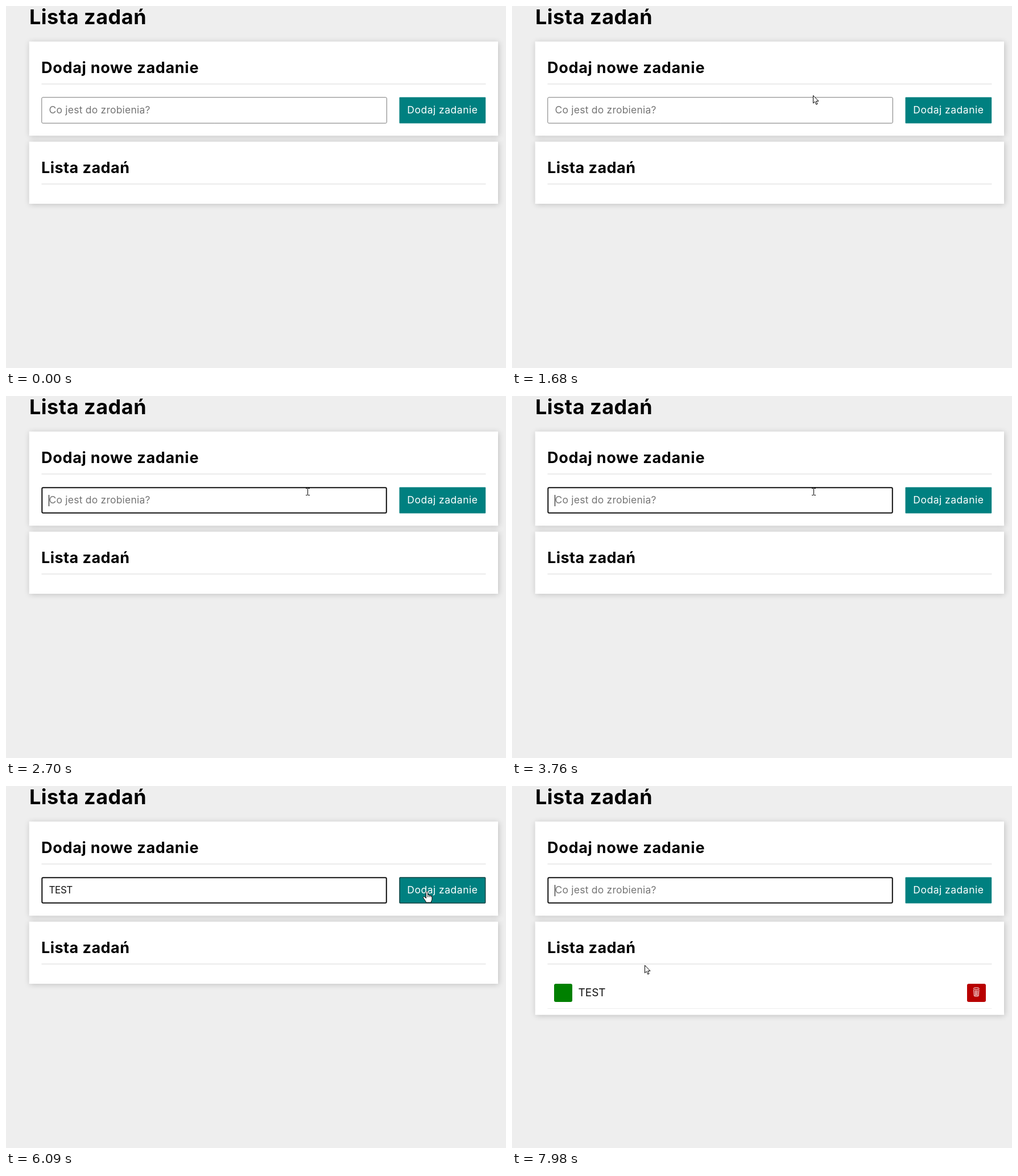
These frames come from a looping animation (879x637 px, 8000 ms). An HTML page with a canvas:

```html
<!DOCTYPE html>
<html lang="pl">
<head>
<meta charset="utf-8">
<title>Lista zadań</title>
<style>
html, body { margin: 0; width: 100%; height: 100%; overflow: hidden; background: #eee; }
canvas { display: block; }
</style>
</head>
<body>
<canvas id="stage" width="879" height="637"></canvas>
<script>
const ctx = document.getElementById('stage').getContext('2d');
const LOOP = 8000, FOCUS = 2700, SUBMIT = 6420, BLINK = 530;
const KEYS = [3960, 4160, 4360, 4490];
const WORD = 'TEST';
const INPUT = { x: 62.3, y: 160.3, w: 607.5, h: 46.4 };
const BUTTON = { x: 691.5, y: 160.5, w: 151.7, h: 46 };

// Pointer moves: first step, last step, number of steps, destination x, y
const MOVES = [
  [380, 520, 3, 791, 216],
  [850, 1270, 7, 722, 174],
  [1470, 1680, 4, 529, 157],
  [1880, 1950, 2, 530, 144],
  [2040, 2170, 2, 530, 162],
  [2220, 2290, 2, 530, 167],
  [2440, 2440, 1, 530, 168],
  [5280, 5280, 1, 559, 167],
  [5350, 5760, 6, 740, 186],
  [6890, 7640, 12, 281, 308],
  [7910, 7980, 2, 233, 315]
];

const ARROW = new Path2D('M.5 .5V14L3.6 11.2L5.8 16.3L8 15.3L5.8 10.4H10Z');
const HAND = new Path2D('M-1.5 1C-1.5 -1 1.5 -1 1.5 1V6C2 5 4 5 4.2 6.8C5 6 6.8 6.2 7 7.8' +
  'C8 7.2 9 8 9 9.5V13C9 15 7.5 16 7.3 19H-1.5C-2 16 -5.5 13 -6.5 10.5C-7 8.5 -4.5 8 -3 10L-1.5 11.5Z');

function pointerAt(t) {
  if (t < MOVES[0][0]) return null;
  let x = 816, y = 561;
  for (const [start, end, steps, toX, toY] of MOVES) {
    if (t < start) break;
    const span = end - start;
    const done = t >= end ? steps : Math.floor((t - start) / span * (steps - 1)) + 1;
    let p = done / steps;
    if (steps > 6) p = p * p * (3 - 2 * p);
    x += (toX - x) * p;
    y += (toY - y) * p;
  }
  return { x: Math.round(x), y: Math.round(y) };
}

const inside = (p, r) => p && p.x >= r.x && p.x < r.x + r.w && p.y >= r.y && p.y < r.y + r.h;

function text(str, x, y, size, color, spacing = 0, weight = 400) {
  ctx.font = `${weight} ${size}px Inter, "Open Sans", sans-serif`;
  ctx.letterSpacing = spacing + 'px';
  ctx.fillStyle = color;
  ctx.fillText(str, x, y);
  return ctx.measureText(str).width;
}

function box(x, y, w, h, color, radius = 0) {
  ctx.fillStyle = color;
  ctx.beginPath();
  ctx.roundRect(x, y, w, h, radius);
  ctx.fill();
}

function outline(r, width, color, radius) {
  ctx.strokeStyle = color;
  ctx.lineWidth = width;
  ctx.beginPath();
  ctx.roundRect(r.x + width / 2, r.y + width / 2, r.w - width, r.h - width, radius);
  ctx.stroke();
}

function card(y, h) {
  ctx.save();
  ctx.shadowColor = 'rgba(0,0,0,.2)';
  ctx.shadowBlur = 10;
  ctx.shadowOffsetX = ctx.shadowOffsetY = 1;
  box(40.7, y, 824.3, h, '#fff');
  ctx.restore();
}

function section(y, h, title, spacing) {
  card(y, h);
  text(title, 62, y + 55.5, 27, '#000', spacing, 700);
  box(62.5, y + 73.3, 781, 2.5, '#eee');
}

function trash(x, y) {
  ctx.strokeStyle = '#fff';
  ctx.lineWidth = 1;
  ctx.beginPath();
  ctx.ellipse(x, y + 2, 5.2, 1.7, 0, 0, Math.PI * 2);
  ctx.moveTo(x - 4.6, y + 4);
  ctx.lineTo(x - 3.8, y + 15);
  ctx.quadraticCurveTo(x, y + 16.6, x + 3.8, y + 15);
  ctx.lineTo(x + 4.6, y + 4);
  for (const dx of [-2, 0, 2]) {
    ctx.moveTo(x + dx, y + 5);
    ctx.lineTo(x + dx * 0.9, y + 14.5);
  }
  ctx.stroke();
}

function taskRow() {
  box(74, 348, 32, 32, '#008000', 3);
  text(WORD, 116.5, 370, 19, '#111');
  box(800, 348, 33, 32, '#b80000', 3);
  trash(816.3, 354.5);
  box(62.5, 391, 781, 1, '#eee');
}

function drawInput(t) {
  const focused = t >= FOCUS;
  box(INPUT.x, INPUT.y, INPUT.w, INPUT.h, '#fff', 2);
  outline(INPUT, focused ? 2 : 1, focused ? '#101010' : '#767676', 2);

  const typed = t < SUBMIT ? WORD.slice(0, KEYS.filter(k => t >= k).length) : '';
  const width = typed
    ? text(typed, 75.5, 189, 17, '#111', -0.4)
    : (text('Co jest do zrobienia?', 75.5, 189, 17.5, '#757575', 0.22), 0);

  const lastInput = [FOCUS, ...KEYS, SUBMIT].filter(k => t >= k).pop();
  const caretOn = focused && Math.floor((t - lastInput) / BLINK) % 2 === 0;
  if (caretOn) box(75 + Math.round(width), 174, 1, 20, '#000');
}

function drawButton(hovered) {
  box(BUTTON.x, BUTTON.y, BUTTON.w, BUTTON.h, '#008080', 1);
  if (hovered) outline(BUTTON, 1, '#102020', 1);
  text('Dodaj zadanie', 705.3, 189, 17.5, '#fff', 0.5);
}

function drawPointer(p, overInput, overButton) {
  ctx.save();
  ctx.translate(p.x, p.y);
  ctx.lineWidth = 1;
  ctx.strokeStyle = '#000';
  ctx.fillStyle = '#fff';
  if (overInput) {
    box(0, -5, 1, 11, '#000');
    for (const y of [-6, 6]) {
      box(-3, y, 3, 1, '#000');
      box(1, y, 3, 1, '#000');
    }
  } else {
    const shape = overButton ? HAND : ARROW;
    ctx.fill(shape);
    ctx.stroke(shape);
    if (overButton) {
      ctx.beginPath();
      for (const x of [1.5, 4.2, 7]) {
        ctx.moveTo(x, 6.5);
        ctx.lineTo(x, 9.5);
      }
      ctx.stroke();
    }
  }
  ctx.restore();
}

function draw(t) {
  const pointer = pointerAt(t);
  const overInput = inside(pointer, INPUT), overButton = inside(pointer, BUTTON);
  const hasTask = t >= SUBMIT;

  box(0, 0, 879, 637, '#eee');
  text('Lista zadań', 41, 32, 36, '#000', 0.5, 700);
  section(62.6, 165.7, 'Dodaj nowe zadanie', 0.7);
  section(238.8, hasTask ? 164 : 109.2, 'Lista zadań', 0.45);
  drawInput(t);
  drawButton(overButton);
  if (hasTask) taskRow();
  if (pointer) drawPointer(pointer, overInput, overButton);
}

const began = performance.now();
function tick() {
  draw((performance.now() - began) % LOOP);
  requestAnimationFrame(tick);
}
tick();
</script>
</body>
</html>
```
